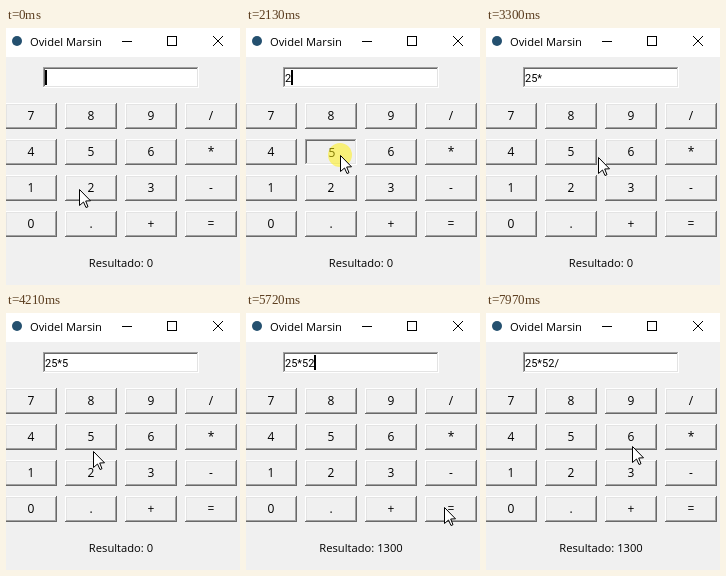
An HTML page with a canvas that plays this animation: 234 by 257 pixels, repeating every 8 s.

```html
<!DOCTYPE html>
<html lang="es">
<head>
<meta charset="utf-8">
<title>Calculadora</title>
<style>
html, body { margin: 0; width: 234px; height: 257px; overflow: hidden; }
canvas { display: block; }
</style>
</head>
<body>
<canvas id="stage" width="234" height="257"></canvas>
<script>
const ctx = document.getElementById('stage').getContext('2d');
const LOOP = 8000;
const FACE = '#f0f0f0';
const UI_FONT = '11.2px "Open Sans", "Noto Sans", sans-serif';
const KEY_FONT = '12px "Open Sans", "Noto Sans", sans-serif';
const ENTRY_FONT = '11px Roboto, "Liberation Sans", sans-serif';
const CLICK = 130; // wait before a press, and length of the press

const BUTTONS = [...'789/456*123-0.+='].map((key, i) => ({
  key, x: i % 4 * 60 - 1, y: 75 + Math.floor(i / 4) * 36, w: 52, h: 26
}));

// Places the pointer visits; a long enough stay is a click
const STOPS = [
  [73, 161, 330, 330],
  [144, 153, 680, 680],
  [94, 162, 1370, 1630],
  [94, 127, 2000, 2260],
  [195, 131, 2610, 2870],
  [86, 129, 3500, 4040],
  [88, 156, 4490, 4750],
  [198, 194, 5460, 6200],
  [205, 90, 6950, 7210],
  [208, 124, 7560, 7720],
  [146, 133, 7970, LOOP]
].map(([x, y, arrive, leave]) => ({ x, y, arrive, leave }));

const CLICKS = STOPS.filter(s => s.leave - s.arrive >= 2 * CLICK).map(s => ({
  down: s.arrive + CLICK,
  up: s.arrive + 2 * CLICK,
  key: BUTTONS.find(b => s.x >= b.x && s.x < b.x + b.w && s.y >= b.y && s.y < b.y + b.h).key
}));

function pointerAt(t) {
  const next = Math.max(1, STOPS.findIndex(s => t < s.leave));
  const a = STOPS[next - 1], b = STOPS[next];
  const u = Math.min(1, Math.max(0, (t - a.leave) / (b.arrive - a.leave)));
  const ease = u * u * (3 - 2 * u);
  return [Math.round(a.x + (b.x - a.x) * ease), Math.round(a.y + (b.y - a.y) * ease)];
}

function rect(x, y, w, h, color) {
  ctx.fillStyle = color;
  ctx.fillRect(x, y, w, h);
}

function disc(x, y, r, color) {
  ctx.fillStyle = color;
  ctx.beginPath();
  ctx.arc(x, y, r, 0, 2 * Math.PI);
  ctx.fill();
}

function text(str, x, y, align = 'center', font = UI_FONT) {
  ctx.font = font;
  ctx.textAlign = align;
  ctx.fillStyle = '#000';
  ctx.fillText(str, x, y);
}

function bevel(x, y, w, h, sunken, fill) {
  const edges = sunken
    ? [['#a0a0a0', '#fff'], ['#696969', '#e3e3e3']]
    : [['#fff', '#696969'], ['#e3e3e3', '#a0a0a0']];
  edges.forEach(([light, dark], i) => {
    rect(x + i, y + i, w - 2 * i, h - 2 * i, dark);
    rect(x + i, y + i, w - 2 * i - 1, h - 2 * i - 1, light);
  });
  rect(x + 2, y + 2, w - 4, h - 4, fill);
}

function titleBar() {
  rect(0, 0, 234, 29, '#fff');
  disc(11, 13, 5, '#24506f');
  text('Ovidel Marsin', 24, 18, 'left');
  rect(116, 13, 10, 1, '#000');
  ctx.strokeStyle = '#000';
  ctx.lineWidth = 1;
  ctx.strokeRect(161.5, 8.5, 9, 9);
  ctx.beginPath();
  ctx.moveTo(207, 8); ctx.lineTo(217, 18);
  ctx.moveTo(217, 8); ctx.lineTo(207, 18);
  ctx.stroke();
}

function entry(value, caret) {
  bevel(37, 39, 156, 21, true, '#fff');
  text(value, 39, 54, 'left', ENTRY_FONT);
  if (caret) rect(39 + Math.floor(ctx.measureText(value).width), 42, 2, 15, '#000');
}

function button({ key, x, y, w, h }, pressed) {
  const shift = pressed ? 1 : 0;
  bevel(x, y, w, h, pressed, FACE);
  text(key, x + w / 2 + shift, y + 17 + shift, 'center', KEY_FONT);
}

function pointer(x, y) {
  const arrow = new Path2D('M0 0V16L4 12.5 6.5 18 8.5 17.2 6.2 11.5 11 11.3Z');
  ctx.save();
  ctx.translate(x + .5, y + .5);
  ctx.fillStyle = '#fff';
  ctx.fill(arrow);
  ctx.strokeStyle = '#000';
  ctx.stroke(arrow);
  ctx.restore();
}

function draw(t) {
  const active = CLICKS.find(c => t >= c.down && t < c.up);
  const typed = CLICKS.filter(c => t >= c.up).map(c => c.key).join('');
  const [x, y] = pointerAt(t);

  rect(0, 0, 234, 257, FACE);
  titleBar();
  entry(typed.replace('=', ''), (t + 140) % 910 < 600);
  BUTTONS.forEach(b => button(b, active && active.key === b.key));
  text('Resultado: ' + (typed.includes('=') ? 25 * 52 : 0), 115, 239);
  if (active) disc(x, y, 12, 'rgba(255, 240, 0, .5)');
  pointer(x, y);
}

const start = performance.now();
function tick() {
  draw((performance.now() - start) % LOOP);
  requestAnimationFrame(tick);
}
tick();
</script>
</body>
</html>
```
